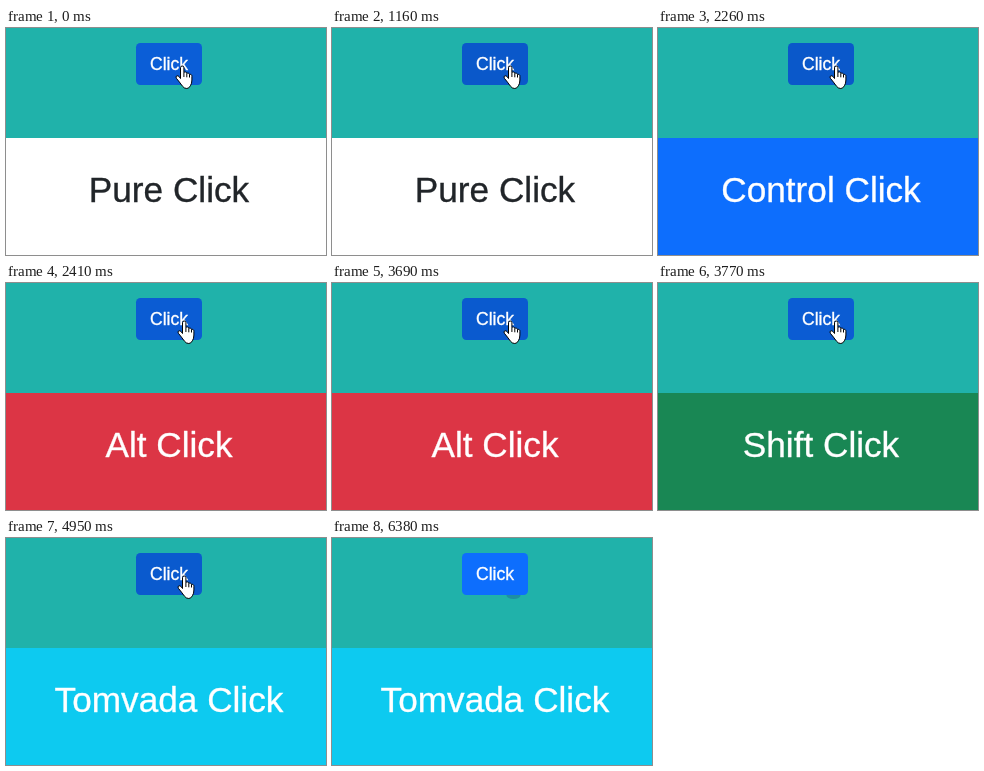
These frames come from a looping animation (320x227 px, 6.78 s). An HTML page:

```html
<!DOCTYPE html>
<html lang="en">
<head>
<meta charset="utf-8">
<title>Click modifiers</title>
<style>
  html, body { margin: 0; height: 100%; overflow: hidden; background: #fff; }
  svg { display: block; width: 100vw; height: 100vh; }
  text {
    font-family: "Liberation Sans", Arial, sans-serif; text-anchor: middle;
    fill: currentColor; stroke: currentColor; stroke-width: .35;
  }
  .pointer { fill: #fff; stroke: #000; stroke-linejoin: round; }
</style>
</head>
<body>
<svg viewBox="0 0 320 227" color="#fff">
  <rect width="320" height="110" fill="#20b2aa"/>
  <rect id="panel" y="110" width="320" height="117"/>
  <text id="title" x="163" y="174" font-size="35.2"></text>
  <ellipse id="shade" cx="181.5" cy="57.5" rx="7" ry="3.5" fill="#1e8fa2"/>
  <rect id="button" x="130" y="15" width="66" height="42" rx="4.4"/>
  <text x="163" y="42" font-size="17.6">Click</text>
  <g id="hand" class="pointer">
    <path d="M5.5 13V2.2Q5.5 .5 7.2 .5Q8.9 .5 8.9 2.2V7.2Q9.3 6.3 10.6 6.5Q11.8 6.7 11.8 8.2Q12.3 7.4 13.4 7.7Q14.5 8 14.5 9.2Q15.2 8.6 16.1 9Q17 9.5 16.9 11V14.5Q16.9 18 15.4 20.3Q14 23 11.8 23Q9 23 7.4 20.6Q4.5 16.5 1.4 12.8Q.4 11.3 1.7 10.4Q3 9.8 4.2 11.2Z"/>
    <path d="M8.9 7.5V11.5M11.8 8.4V11.8M14.5 9.4V12" fill="none"/>
  </g>
  <path id="arrow" class="pointer" d="M.5 .5V16.5L4.2 13L6.7 18.8L9.3 17.7L6.8 12H12Z"/>
</svg>
<script>
const LOOP = 6780, LEAVE = 6230;
const HOVER = [11, 94, 215], ACTIVE = [10, 88, 202], NORMAL = [13, 110, 253];

// start: panel change; press and release: button darkens, then fades back
const scenes = [
  { start: 0, title: "Pure Click", fill: "#fff", ink: "#212529" },
  { press: 1160, start: 1240, release: 1390, title: "Control Click", fill: "#0d6efd" },
  { press: 2260, start: 2340, release: 2490, title: "Alt Click", fill: "#dc3545" },
  { press: 3610, start: 3770, release: 3840, title: "Shift Click", fill: "#198754" },
  { press: 4870, start: 4950, release: 5110, title: "Tomvada Click", fill: "#0dcaf0" }
];

const [panel, title, shade, button, hand, arrow] =
  ["panel", "title", "shade", "button", "hand", "arrow"].map(id => document.getElementById(id));
const mix = (a, b, k) => `rgb(${a.map((v, i) => Math.round(v + (b[i] - v) * k))})`;
const show = (el, on) => el.setAttribute("visibility", on ? "visible" : "hidden");
const place = (el, x, y) => el.setAttribute("transform", `translate(${x} ${y})`);

function buttonColor(t) {
  if (t >= LEAVE) return mix(HOVER, NORMAL, Math.min(1, (t - LEAVE + 50) / 150));
  const s = scenes.find(s => t >= s.press && t < s.release);
  return mix(HOVER, ACTIVE, s ? (s.release - t) / (s.release - s.press) : 0);
}

function draw(t) {
  const scene = scenes.filter(s => t >= s.start).pop();
  panel.setAttribute("fill", scene.fill);
  title.setAttribute("color", scene.ink || "#fff");
  if (title.textContent !== scene.title) title.textContent = scene.title;
  button.setAttribute("fill", buttonColor(t));

  show(hand, t < LEAVE);
  place(hand, 169 + (t >= 70) + (t >= 1000), 37.5);
  show(arrow, t >= LEAVE && t < 6380);
  if (t < 6300) place(arrow, 236, 45);
  else place(arrow, 307, 53);
  show(shade, t >= LEAVE);
}

const origin = performance.now();
function tick() {
  draw((performance.now() - origin) % LOOP);
  requestAnimationFrame(tick);
}
tick();
</script>
</body>
</html>
```
